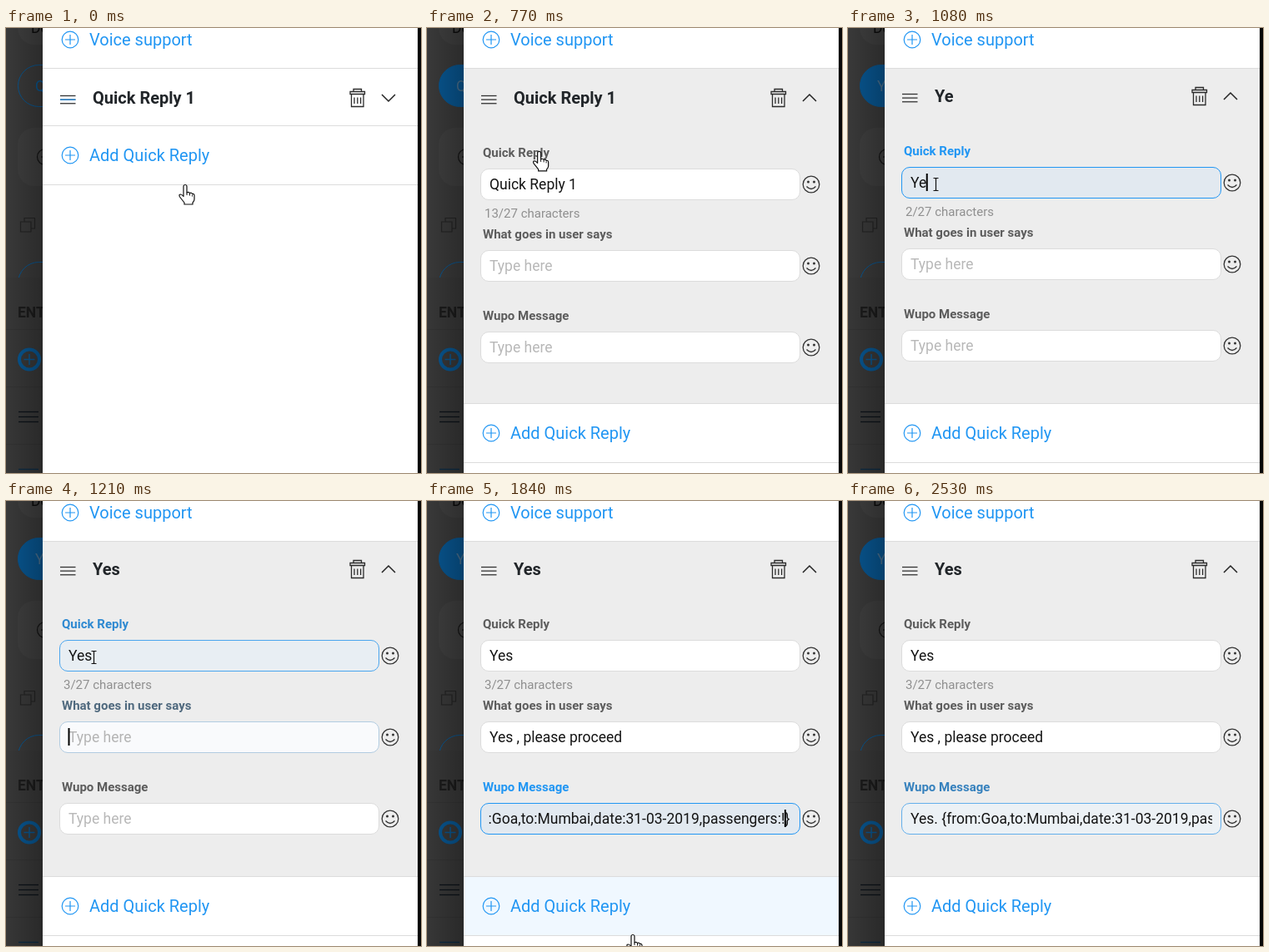
These frames come from a looping animation (498 px wide and 535 px high, 2590 ms). An HTML page:

```html
<!DOCTYPE html>
<html lang="en">
<head>
<meta charset="utf-8">
<title>Quick reply editor</title>
<style>
html, body { margin: 0; width: 100%; height: 100%; overflow: hidden; background: #000; }
svg { display: block; width: 498px; height: 535px; font-family: Roboto, Arial, sans-serif; }
text { white-space: pre; }
</style>
</head>
<body>
<svg id="stage" viewBox="0 0 498 535"></svg>
<script>
const LOOP = 2590, FADE = 200, BLINK = 560;
const BLUE = '#2196f3', DIM_BLUE = '#08558f', INK = '#212529', LINE = '#dcdcdc', CARD = '#3e3e3e';
const OLD_REPLY = 'Quick Reply 1', NEW_REPLY = 'Yes', SAID = 'Yes , please proceed';
const MESSAGE = 'Yes. {from:Goa,to:Mumbai,date:31-03-2019,passengers:!';

// Moments when the user acts.
const FOCUS_1 = 810, SELECT = 920, RETYPE = 1070, FOCUS_2 = 1150, FOCUS_3 = 1360, BLUR = 2450;
const OPEN = { start: 428, length: 190 };

// Where the pointer travels, and when.
const HOME = { x: 215, y: 189 };
const MOVES = [
  { start: 270, end: 420, x: 196, y: 65 },
  { start: 640, end: 850, x: 106, y: 188 },
  { start: 1290, end: 1450, x: 119, y: 385 },
  { start: 1700, end: 1840, x: 247, y: 522 },
  { start: 1880, end: 2070, x: 373, y: 523 }
];

const stage = document.getElementById('stage');
const ruler = document.createElement('canvas').getContext('2d');

function widthOf(value) {
  ruler.font = '17.5px Roboto, Arial, sans-serif';
  return ruler.measureText(value).width;
}

function ease(t, start, length) {
  const k = Math.min(1, Math.max(0, (t - start) / length));
  return k * k * (3 - 2 * k);
}

const focusOf = (t, on, off) => ease(t, on, FADE) - ease(t, off, FADE);
const typed = (t, start, length, value) =>
  value.slice(0, Math.max(0, Math.ceil((t - start) / length * value.length)));

function mix(from, to, k) {
  const part = (c, i) => parseInt(c.slice(i, i + 2), 16);
  return `rgb(${[1, 3, 5].map(i => Math.round(part(from, i) + (part(to, i) - part(from, i)) * k))})`;
}

const text = (x, y, size, fill, value, more = '') =>
  `<text x="${x}" y="${y}" font-size="${size}" fill="${fill}" ${more}>${value}</text>`;
const bold = (x, y, size, fill, value) => text(x, y, size, fill, value, 'font-weight="700"');
const rect = (x, y, w, h, fill, more = '') =>
  `<rect x="${x}" y="${y}" width="${w}" height="${h}" fill="${fill}" ${more}/>`;
const path = (d, stroke, width = 1.2) =>
  `<path d="${d}" fill="none" stroke="${stroke}" stroke-width="${width}"/>`;
const circle = (x, y, r, stroke, width = 1.2) =>
  `<circle cx="${x}" cy="${y}" r="${r}" fill="none" stroke="${stroke}" stroke-width="${width}"/>`;
const dot = (x, y) => `<circle cx="${x}" cy="${y}" r="1.5" fill="#333"/>`;
const at = (x, y, body, turn = 0) => `<g transform="translate(${x} ${y}) rotate(${turn})">${body}</g>`;
const divider = y => rect(44, y, 450, 1, LINE);
const plus = (x, y, r) => `M${x - r} ${y}h${2 * r}M${x} ${y - r}v${2 * r}`;
const bars = (x, y, w, stroke) => [0, 1, 2].map(i => path(`M${x} ${y + i * w / 4}h${w}`, stroke, 1.3)).join('');

function addRow(y, label) {
  return circle(77, y, 9.8, BLUE) + path(plus(77, y, 6), BLUE) + text(100, y + 7, 20, BLUE, label);
}

function backdrop(fill, letter) {
  const card = (y, h) => rect(14, y, 60, h, CARD, 'rx="20"');
  const pill = (y, color) => rect(14.5, y, 90, 50, color, `rx="25" stroke="${DIM_BLUE}"`);
  return rect(0, 0, 44, 535, '#393939') +
    card(-60, 80) + text(30, 6, 17.5, '#0c0c0c', 'Do') +
    pill(44.5, mix('#393939', DIM_BLUE, fill)) +
    text(35, 76, 17.5, mix(DIM_BLUE, '#4a6f8c', fill), letter) +
    card(120, 70) + circle(47, 155, 9.5, '#141414') + path('M42 155h10', '#141414') +
    path('M22 233v-4.5h12.5v12.5h-4.5M17.5 233h12.5v12h-12.5z', '#232323') +
    pill(281.5, 'none') +
    rect(0, 300, 44, 235, '#373737') + bold(14, 348, 17.5, '#1b1b1b', 'ENTRY') +
    [0, 1, 2].map(i => rect(0, 362 + 69 * i, 44, 1, '#323232')).join('') +
    circle(28, 398.5, 12, DIM_BLUE, 4) + path(plus(28, 398.5, 6.5), DIM_BLUE, 1.5) +
    bars(15, 461.5, 24, '#0c1218') + bars(15, 530.5, 24, '#0c2a42') +
    rect(0, 0, 44, 535, 'url(#shade)');
}

function header(title, open) {
  const stripes = [418, 421.8, 425.6].map(x => `M${x} 83.5v7.5`).join('');
  return bars(65, 81.5, 18.5, '#333') +
    (open ? '' : path('M65 86.1h18.5', BLUE)) +
    bold(104, 91, 20, INK, title) +
    path('M413 76.5h17.5v3h-17.5zM417 76v-2.5h9.5v2.5M414.5 79.5v15h14.5v-15' + stripes, '#2b2b2b', 1.3) +
    at(459, 84, path('M-8 -4 L0 4 L8 -4', '#222', 1.5), 180 * open ** 1.2);
}

function smiley(y) {
  return circle(461, y, 9.8, '#333', 1.3) + dot(457.5, y - 3) + dot(464.5, y - 3) +
    path(`M455.5 ${y + 2.5}q5.5 6 11 0`, '#333', 1.3);
}

// "before" and "after" are the text on each side of the caret.
function field(y, label, focus, { before = '', after = '', caret, selected, scrolled }) {
  const value = before + after;
  const x = scrolled ? Math.min(75, 435.3 - widthOf(value)) : 75;
  const inner =
    (selected ? rect(75, y + 8, widthOf(value), 21, '#3390ff') : '') +
    (value ? text(x, y + 25, 17.5, selected ? '#fff' : '#141414', value)
      : text(75, y + 25, 17.5, mix('#b8b8b8', '#a4a4a4', focus), 'Type here')) +
    (caret ? rect(x + widthOf(before) - 0.5, y + 8, 2, 21, '#000') : '');
  return bold(67, y - 14, 15, mix('#5c5c5c', BLUE, focus), label) +
    rect(64.5, y + 0.5, 383, 37, mix('#ffffff', '#e2e9f0', focus), `rx="9.5" stroke="${mix(LINE, BLUE, focus)}"`) +
    `<g clip-path="url(#inner)">${inner}</g>` + smiley(y + 19);
}

function pointerAt(t) {
  return MOVES.reduce((p, m) => {
    const k = ease(t, m.start, m.end - m.start);
    return { x: p.x + (m.x - p.x) * k, y: p.y + (m.y - p.y) * k };
  }, HOME);
}

const HAND = '<path d="M-2 1.5a2 2 0 0 1 4 0V9q2-1.5 3.5 .5q2-1 3 1q2.5-.5 2.5 2V17q0 2-2 4V23H-1V21L-6.5 14q-1.5-3 1-3q1.5 0 3.5 2.5z" fill="#fff" stroke="#111" stroke-width="1.2" stroke-linejoin="round"/>' +
  path('M2 9v3M5.5 10v2.5M8.5 11.5v2', '#111', 1);
const BEAM = path('M-3 -7.5h2.5l.5 1l.5 -1h2.5M0 -7v14M-3 7.5h2.5l.5 -1l.5 1h2.5', '#111');
const BEAM_TIP = path('M-5 -7h3.5M-.5 -7h3.5', '#35b24a', 1.8);

function pointer(t, p, selected) {
  if (t >= 2220) return '';
  const overText = t >= MOVES[1].end && t < MOVES[3].start + 50;
  if (!overText) return at(p.x, p.y, HAND);
  return at(Math.round(p.x) - 0.5, Math.round(p.y), selected ? BEAM_TIP : BEAM);
}

function render(t) {
  const open = ease(t, OPEN.start, OPEN.length);
  const bottom = Math.round(117 + 334 * open);
  const retyped = t >= RETYPE;
  const selected = t >= SELECT && !retyped;
  const reply = retyped ? typed(t + 20, RETYPE, 60, NEW_REPLY) : OLD_REPLY;
  const message = typed(t, 1560, 240, MESSAGE);
  const p = pointerAt(t);
  const hover = t < 2220 && p.y > bottom && p.y <= bottom + 71;
  const caret = (on, off) => t >= on && t < off && (t - on) % (2 * BLINK) < BLINK;

  const form =
    field(169, 'Quick Reply', focusOf(t, FOCUS_1, FOCUS_2),
      { before: reply, selected, caret: retyped && caret(FOCUS_1, FOCUS_2) }) +
    text(69, 228, 15, '#8f8f8f', `${reply.length}/27 characters`) +
    field(267, 'What goes in user says', focusOf(t, FOCUS_2, FOCUS_3),
      { before: typed(t, 1270, 85, SAID), caret: caret(FOCUS_2, FOCUS_3) }) +
    field(365, 'Wupo Message', focusOf(t, FOCUS_3, BLUR),
      { before: message, after: message && '}', caret: caret(FOCUS_3, BLUR), scrolled: t < BLUR });

  stage.innerHTML = `<defs>
    <linearGradient id="shade"><stop offset="0" stop-opacity="0"/><stop offset="1" stop-opacity=".25"/></linearGradient>
    <clipPath id="inner">${rect(74, 140, 363, 280, '#fff')}</clipPath>
    <clipPath id="body">${rect(44, 49, 450, bottom - 49, '#fff')}</clipPath></defs>` +
    backdrop(ease(t, 400, 280), reply[0]) +
    rect(494, 0, 4, 535, '#050505') + rect(44, 0, 450, 535, '#fff') +
    addRow(14, 'Voice support') +
    rect(44, 48, 450, bottom - 48, mix('#ffffff', '#ededed', open ** 1.75)) + divider(48) +
    '<g clip-path="url(#body)">' + at(0, retyped ? -2 : 0, header(reply, open) + (open ? form : '')) + '</g>' +
    rect(44, bottom, 450, 71, hover ? '#f0f8ff' : '#fff') + divider(bottom) +
    addRow(bottom + 36, 'Add Quick Reply') + divider(bottom + 71) +
    pointer(t, p, selected);
}

const start = performance.now();
function tick() {
  render((performance.now() - start) % LOOP);
  requestAnimationFrame(tick);
}
tick();
</script>
</body>
</html>
```
